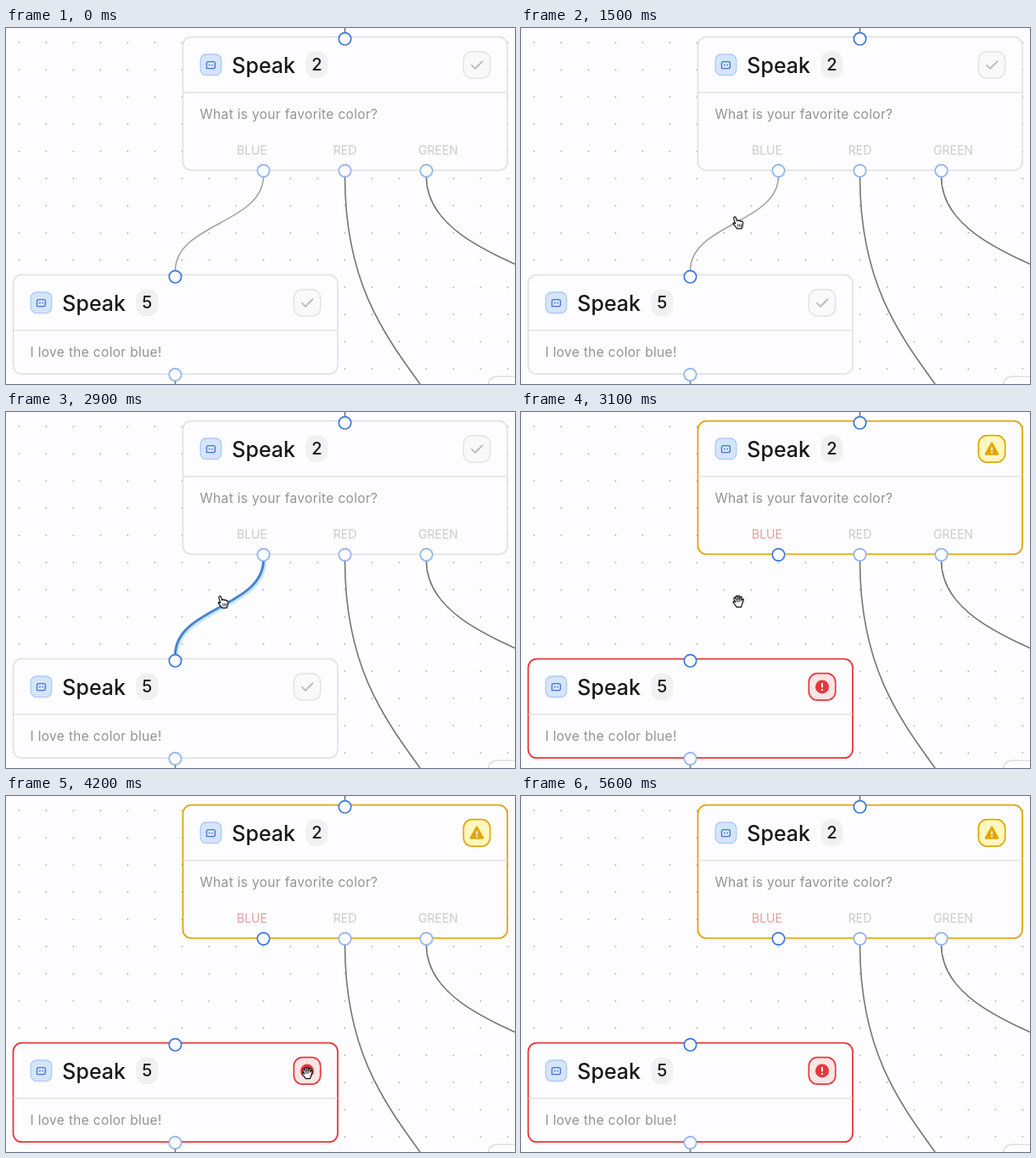
These frames come from a looping animation (600x419 px, 5.7 s). An HTML page:

```html
<!DOCTYPE html>
<html lang="en">
<head>
<meta charset="utf-8">
<title>Flow editor</title>
<style>
  html, body { margin: 0; width: 100%; height: 100%; overflow: hidden; background: #fdfcff; }
  svg { display: block; width: 600px; height: 419px; font-family: Inter, "Open Sans", sans-serif; }
  .card { fill: #fdfcff; stroke: #dedee3; stroke-width: 1.5; }
  .card.warning { stroke: #dfa70f; stroke-width: 1.8; }
  .card.error { stroke: #e5383b; stroke-width: 1.8; }
  .title { font-size: 25px; font-weight: 500; fill: #18181b; }
  .count { font-size: 20px; font-weight: 500; fill: #18181b; text-anchor: middle; }
  .body { font-size: 15.5px; letter-spacing: .33px; fill: #929297; }
  .label { font-size: 14px; fill: #cacacf; text-anchor: middle; }
  .label.missing { fill: #e59a9e; }
  .edge { fill: none; stroke: #777; stroke-width: 1.6; }
  .handle { fill: #fff; stroke: #3b79dc; stroke-width: 1.7; }
  .handle.soft { fill: #fbfcff; stroke: #91b3ed; }
</style>
</head>
<body>
<svg id="stage" viewBox="0 0 600 419"></svg>
<script>
const LOOP = 5700, STEP = 100;
const HOVER = 1300, SELECT = 1700, REMOVE = 3100, TIP_IN = 4200, CURSOR_OUT = 4700;

const handle = (x, y, soft, id = "") =>
  `<circle ${id && `id="${id}"`} class="handle${soft ? " soft" : ""}" cx="${x}" cy="${y}" r="7.2"/>`;

// Vertical connector whose control points sit halfway between its ends
const edgePath = (x1, y1, x2, y2) => {
  const mid = (y1 + y2) / 2;
  return `M${x1} ${y1}C${x1} ${mid} ${x2} ${mid} ${x2} ${y2}`;
};

const bang = (x, y, k) => `<g transform="translate(${x} ${y}) scale(${k})" fill="#fff">
  <rect x="-1" y="-4.6" width="2" height="5.6" rx="1"/><circle cy="3.5" r="1.2"/></g>`;

const statusBox = (fill, stroke, width) =>
  `<rect x="-15.7" y="-15.7" width="31.4" height="31.4" rx="10" fill="${fill}" stroke="${stroke}" stroke-width="${width}"/>`;

const statusArt = {
  ok: statusBox("#f9f9fb", "#e2e2e6", 1.4) +
    `<path d="M-6 .5L-2 4.4 6.5-4.2" fill="none" stroke="#bdbdc2" stroke-width="2" stroke-linecap="round" stroke-linejoin="round"/>`,
  warning: statusBox("#fff7bd", "#dfa70f", 1.7) +
    `<path d="M0-6.5L7 6H-7Z" fill="#dfa70f" stroke="#dfa70f" stroke-width="2.5" stroke-linejoin="round"/>` + bang(0, 1.5, .82),
  error: statusBox("#fde4e5", "#e5383b", 1.7) +
    `<circle r="8" fill="#e5383b"/>` + bang(0, 0, 1)
};

const card = (id, x, y, height, count, text) => `
  <g transform="translate(${x} ${y})">
    <rect id="card${id}" class="card" width="382.5" height="${height}" rx="10"/>
    <path d="M0 65.3H382.5" stroke="#dedee3" stroke-width="1.4"/>
    <rect x="20.7" y="20.4" width="24.6" height="24.6" rx="7" fill="#d4e5fd" stroke="#aac9f8" stroke-width="1.3"/>
    <path d="M28 37V31a2 2 0 0 1 2-2H36a2 2 0 0 1 2 2V35a2 2 0 0 1-2 2Z" fill="none" stroke="#4474cf" stroke-width="1.3" stroke-linejoin="round"/>
    <circle cx="31.3" cy="33" r=".9" fill="#4474cf"/><circle cx="34.8" cy="33" r=".9" fill="#4474cf"/>
    <text class="title" x="57.8" y="42">Speak</text>
    <rect x="144.8" y="16.7" width="26" height="32" rx="11.5" fill="#f1f1f2"/>
    <text class="count" x="157.8" y="39.7">${count}</text>
    <text class="body" x="20" y="96.4">${text}</text>
    <g id="status${id}" transform="translate(346.5 32.8)"></g>
  </g>`;

const dots = () => {
  let d = "";
  for (let y = 17.2; y < 419; y += 32)
    for (let x = 15.4; x < 600; x += 32) d += `M${x} ${y}h.01`;
  return `<path d="${d}" stroke="#b5b5ba" stroke-width="1.9" stroke-linecap="round"/>`;
};

const blueEdge = edgePath(303.5, 174, 199.5, 286);
const stage = document.getElementById("stage");
stage.innerHTML = `
  ${dots()}
  <path class="edge" d="M399.5 0V6M199.5 414V419"/>
  <path class="edge" d="${edgePath(399.5, 175, 576.5, 663)}"/>
  <path class="edge" d="${edgePath(495.5, 175, 759, 405)}"/>
  <g id="link">
    <path id="glow" d="${blueEdge}" transform="translate(1 1.5)" fill="none" stroke="#c3ecfb" stroke-width="5"/>
    <path id="line" class="edge" d="${blueEdge}"/>
  </g>
  ${card("Ask", 208.5, 10.6, 156.8, 2, "What is your favorite color?")}
  ${card("Reply", 8.5, 290.6, 116.6, 5, "I love the color blue!")}
  <rect class="card" x="568.5" y="410.3" width="382" height="116" rx="10"/>
  <text id="blueLabel" class="label" x="290" y="149">BLUE</text>
  <text class="label" x="399.5" y="149">RED</text>
  <text class="label" x="509.5" y="149">GREEN</text>
  <g id="tip">
    <rect x="142.5" y="263.5" width="116" height="21" rx="5" fill="#fff" stroke="#e6e6ea"/>
    <circle cx="153" cy="274" r="5" fill="#e5383b"/>${bang(153, 274, .65)}
    <text x="161.5" y="277.6" font-size="9.9" font-weight="500" fill="#3f3f46">Configuration error</text>
  </g>
  ${handle(399.5, 12.8)}
  ${handle(303.5, 168, true, "blueHandle")}
  ${handle(399.5, 168, true)}
  ${handle(495.5, 168, true)}
  ${handle(199.5, 292.8)}
  ${handle(199.5, 408, true)}
  <g id="cursor" fill="#fff" stroke="#111" stroke-width="1.2" stroke-linejoin="round" stroke-linecap="round">
    <g id="point">
      <path d="M-3.4 1.5L-5.2-4.8C-5.7-6.9-3.4-7.6-2.7-5.7L-1.4-2C-.8-3.2.8-3 1-1.8 1.8-2.8 3.2-2.4 3.3-1.2 4.6-2 5.7-1 5.6.6L5.2 4 4 7.2H-1.5C-2.3 5.2-5 3.4-5.8 1.6-6.3.3-4.7-.3-3.4 1.5Z"/>
      <path d="M-.3 2V4.8M1.6 2V4.8M3.4 2V4.8" stroke-width=".8"/>
    </g>
    <g id="grab">
      <path d="M-3.2 1L-5-3C-5.4-4.7-3.5-5.3-2.8-3.8L-2.1-2.2-2.9-5C-3.1-6.7-1.2-7.1-.8-5.5L-.2-2.8V-5.7C0-7.2 1.7-7.1 1.8-5.6V-2.6L2.5-4.8C3-6.2 4.6-5.6 4.3-4.1L3.8-1.2 4.7-2.4C5.6-3.4 6.8-2.6 6.1-1.2L4.6 3.3 3.5 6.6H-2C-2.4 4.6-5.2 3-5.9 1.1-6.1-.4-4.5-.5-3.2 1Z"/>
      <path d="M-2.1-2.2L-1.2 .6M-.2-2.8L.2 .3M1.8-2.6V.3" stroke-width=".8"/>
    </g>
  </g>`;

const el = id => document.getElementById(id);
const show = (id, visible) => el(id).setAttribute("visibility", visible ? "inherit" : "hidden");
const clamp = v => Math.max(0, Math.min(1, v));
const ease = v => v * v * (3 - 2 * v);

// time, x, y
const route = [
  [1300, 254, 230], [1500, 256, 229], [1900, 258, 229], [2400, 258, 229],
  [3000, 256, 223], [3500, 256, 223], [3800, 261, 263], [4200, 355, 326]
];

function cursorAt(t) {
  const next = route.findIndex(p => p[0] > t);
  if (next < 0) return route[route.length - 1].slice(1);
  if (next === 0) return route[0].slice(1);
  const [t0, x0, y0] = route[next - 1], [t1, x1, y1] = route[next];
  const k = ease((t - t0) / (t1 - t0));
  return [x0 + (x1 - x0) * k, y0 + (y1 - y0) * k];
}

let broken = null;
function setBroken(value) {
  if (value === broken) return;
  broken = value;
  el("cardAsk").classList.toggle("warning", broken);
  el("cardReply").classList.toggle("error", broken);
  el("statusAsk").innerHTML = statusArt[broken ? "warning" : "ok"];
  el("statusReply").innerHTML = statusArt[broken ? "error" : "ok"];
  el("blueLabel").classList.toggle("missing", broken);
  el("blueHandle").classList.toggle("soft", !broken);
  show("link", !broken);
}

function draw(t) {
  setBroken(t >= REMOVE);
  const selected = t >= SELECT && t < REMOVE;
  show("glow", selected);
  el("line").style.stroke = selected ? "#4a80d4" : "#a3a3a3";
  el("line").style.strokeWidth = selected ? 3 : 1.6;

  show("cursor", t >= HOVER && t < CURSOR_OUT);
  show("point", t < REMOVE);
  show("grab", t >= REMOVE);
  el("cursor").setAttribute("transform", `translate(${cursorAt(t)})`);

  const fadeIn = clamp((t - TIP_IN) / 200), fadeOut = clamp((4900 - t) / 250);
  el("tip").setAttribute("opacity", Math.min(fadeIn, fadeOut));
}

const start = performance.now();
function tick() {
  const t = (performance.now() - start) % LOOP;
  draw(Math.floor(t / STEP) * STEP);
  requestAnimationFrame(tick);
}
tick();
</script>
</body>
</html>
```
